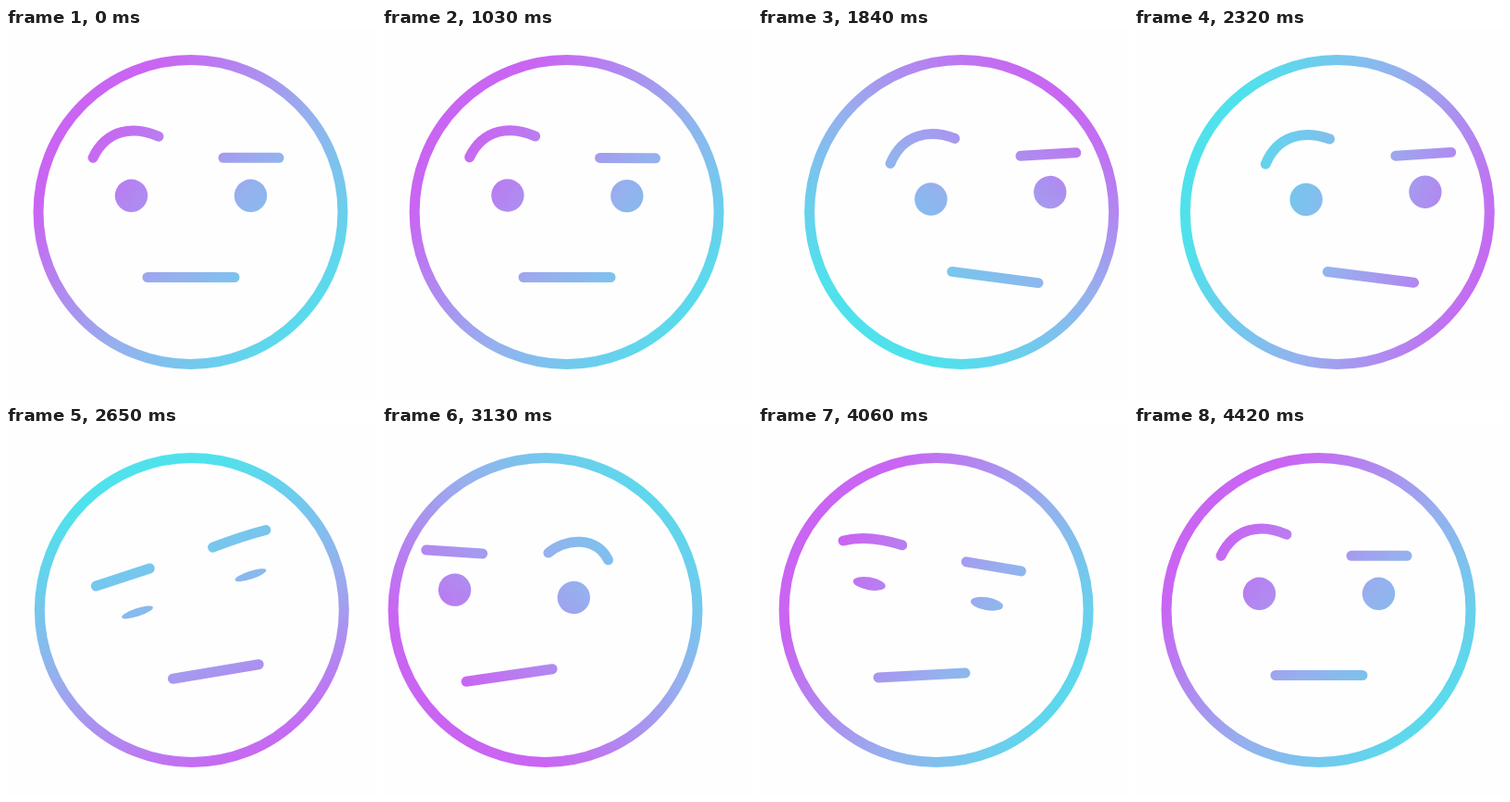
An HTML page for the animation above (4450 ms loop, 400 by 400 pixels).

```html
<!DOCTYPE html>
<html lang="en">
<head>
<meta charset="utf-8">
<title>Raised eyebrow</title>
<style>
html, body { margin: 0; width: 100%; height: 100%; overflow: hidden; background: #fefefe; }
svg { display: block; width: 100vw; height: 100vh; }
</style>
</head>
<body>
<svg viewBox="0 0 400 400">
  <defs>
    <linearGradient id="tint" gradientUnits="userSpaceOnUse">
      <stop offset="0" stop-color="#c965f2"/>
      <stop offset=".5" stop-color="#96b0ee"/>
      <stop offset="1" stop-color="#4fe2ec"/>
    </linearGradient>
    <mask id="face" maskUnits="userSpaceOnUse" x="0" y="0" width="400" height="400">
      <g fill="none" stroke="#fff" stroke-width="11" stroke-linecap="round">
        <circle id="head" cy="199" r="164.5"/>
        <path id="mouth" d="M-47 0H47"/>
        <g id="upper">
          <path id="browL"/>
          <path id="browR"/>
          <ellipse id="eyeL" cx="-64.5" rx="17.7" fill="#fff" stroke="none"/>
          <ellipse id="eyeR" cx="64.5" rx="17.7" fill="#fff" stroke="none"/>
        </g>
      </g>
    </mask>
  </defs>
  <rect width="400" height="400" fill="url(#tint)" mask="url(#face)"/>
</svg>
<script>
const LOOP = 4450, REST = 1030, STEP = 30;
const el = id => document.getElementById(id);
const set = (id, attrs) => {
  for (const k in attrs) el(id).setAttribute(k, attrs[k]);
};

const clamp = u => Math.min(1, Math.max(0, u));
const smooth = u => u * u * (3 - 2 * u);
const ease = (t, from, to) => smooth(clamp((t - from) / (to - from)));
// Rises from a to b, falls back from b to c
const bump = (t, a, b, c) => ease(t, a, b) - ease(t, b, c);

// 0 = ahead, 1 = right, -1 = left; each turn overshoots, then settles
function look(t, [a, b], [c, d], [e, f]) {
  const over = bump(t, 1010, 1490, 1900) - bump(t, 2290, 3090, 3760);
  return ease(t, a, b) - 2 * ease(t, c, d) + ease(t, e, f) + 0.12 * over;
}

const flatL = [-98, -41, -78, -41, -57, -41, -37, -41];
const archL = [-106, -41, -91, -72, -62, -76, -35, -64];
const flatR = [35, -41, 55, -41, 75, -41, 95, -41];
const archR = [34, -46.5, 51, -63, 84, -68.5, 99, -43];

function brow(flat, arch, k) {
  const p = flat.map((v, i) => v + (arch[i] - v) * k);
  return `M${p.slice(0, 2)}C${p.slice(2)}`;
}

const place = (x, y, tilt) => ({ transform: `translate(${x} ${y}) rotate(${tilt})` });

function drawTint(t) {
  const u = clamp((t - REST) / (LOOP - STEP - REST));
  const a = (40 + 360 * smooth(u ** 0.8)) * Math.PI / 180;
  const dx = 160 * Math.cos(a), dy = 160 * Math.sin(a), cx = 238, cy = 200;
  set('tint', { x1: cx - dx, y1: cy - dy, x2: cx + dx, y2: cy + dy });
}

function draw(t) {
  drawTint(t);

  const head = look(t, [1010, 1490], [2290, 3070], [3760, 4250]);
  const upper = look(t, [1010, 1430], [2290, 3070], [3760, 4240]);
  const mouth = look(t, [1030, 1530], [2420, 3150], [3780, 4280]);
  const dip = bump(t, 2290, 2650, 3130);
  const nod = bump(t, 1010, 1200, 1470) + bump(t, 3760, 3980, 4250);
  set('head', { cx: 199.5 + 20.5 * head });
  set('upper', place(200 + 51 * upper, 181.3, 11 * nod - 18 * dip - 3.3 * upper));
  set('mouth', place(200 + 56 * mouth, 269.5 - 4 * dip, 7.4 * mouth - 13 * dip));

  const raiseL = 1 - bump(t, 1030, 1220, 1500) - ease(t, 2300, 2560) + ease(t, 3980, 4220);
  const raiseR = ease(t, 2600, 2950) - ease(t, 3780, 3970);
  set('browL', { d: brow(flatL, archL, raiseL) });
  set('browR', { d: brow(flatR, archR, raiseR) });

  const blink = bump(t, 1040, 1230, 1490) + bump(t, 2420, 2600, 2775) + bump(t, 3800, 3980, 4180);
  const ry = 17.7 * (1 - 0.94 * blink);
  set('eyeL', { ry });
  set('eyeR', { ry });
}

const start = performance.now();
function tick() {
  const t = (performance.now() - start) % LOOP;
  draw(t < REST ? 0 : REST + Math.floor((t - REST) / STEP) * STEP);
  requestAnimationFrame(tick);
}
tick();
</script>
</body>
</html>
```
